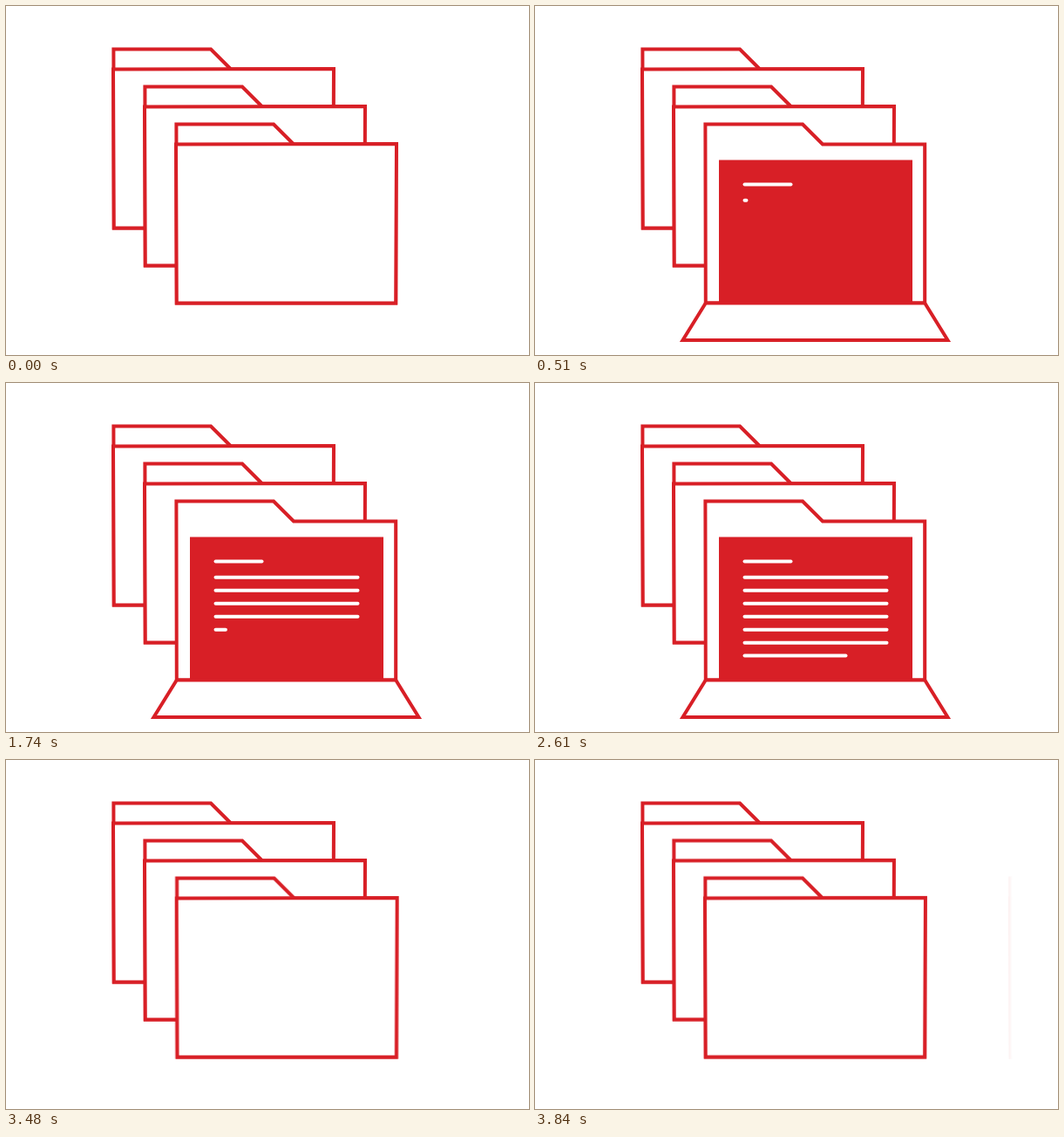
Recreate the animation shown at these times as an HTML page. Size 600 by 400 pixels, loop 4230 ms.

```html
<!DOCTYPE html>
<html lang="en">
<head>
<meta charset="utf-8">
<title>Folders</title>
<style>
  html, body { margin: 0; width: 100%; height: 100%; overflow: hidden; background: #fff; }

  svg {
    --fade: linear-gradient(90deg, transparent 33px, #000 113px, #000 478px, transparent 548px);
    display: block;
    width: 600px;
    height: 400px;
    -webkit-mask-image: var(--fade);
    mask-image: var(--fade);
  }

  .shape { fill: #fff; stroke: #d81f26; stroke-width: 4; }
  .doc { fill: #d81f26; }
  .lines { stroke: #fff; stroke-width: 4; stroke-linecap: round; stroke-dasharray: 100 200; }

  .panel, .lines path, .slide {
    animation: 4230ms cubic-bezier(.37, 0, .63, 1) infinite both;
  }

  /* Front panel folds down, then back up */
  .panel { animation-name: fold; }
  @keyframes fold {
    0%, 75.41%, 100% { d: path("M195 158.5L448 158L447.2 340.5L195.8 340.5Z"); }
    6.86%, 68.32% { d: path("M169.5 383L473.5 383L447.2 340.5L195.8 340.5Z"); }
  }

  /* Text lines are written one after another */
  .lines path:nth-child(1) { animation-name: line1; }
  .lines path:nth-child(2) { animation-name: line2; }
  .lines path:nth-child(3) { animation-name: line3; }
  .lines path:nth-child(4) { animation-name: line4; }
  .lines path:nth-child(5) { animation-name: line5; }
  .lines path:nth-child(6) { animation-name: line6; }
  .lines path:nth-child(7) { animation-name: line7; }
  .lines path:nth-child(8) { animation-name: line8; }
  @keyframes line1 { 0%, 6.83% { stroke-dashoffset: 100.1; } 11.56%, 100% { stroke-dashoffset: 0; } }
  @keyframes line2 { 0%, 11.56% { stroke-dashoffset: 100.1; } 18.65%, 100% { stroke-dashoffset: 0; } }
  @keyframes line3 { 0%, 18.65% { stroke-dashoffset: 100.1; } 25.74%, 100% { stroke-dashoffset: 0; } }
  @keyframes line4 { 0%, 25.74% { stroke-dashoffset: 100.1; } 32.84%, 100% { stroke-dashoffset: 0; } }
  @keyframes line5 { 0%, 32.84% { stroke-dashoffset: 100.1; } 39.93%, 100% { stroke-dashoffset: 0; } }
  @keyframes line6 { 0%, 39.93% { stroke-dashoffset: 100.1; } 47.02%, 100% { stroke-dashoffset: 0; } }
  @keyframes line7 { 0%, 47.02% { stroke-dashoffset: 100.1; } 54.11%, 100% { stroke-dashoffset: 0; } }
  @keyframes line8 { 0%, 54.11% { stroke-dashoffset: 100.1; } 61.21%, 100% { stroke-dashoffset: 0; } }

  /* The stack moves up by one place */
  .enter { animation-name: enter; animation-timing-function: cubic-bezier(.333, 1, .667, 1); }
  .back { animation-name: back; }
  .middle { animation-name: middle; }
  .leave { animation-name: leave; animation-timing-function: cubic-bezier(.333, 0, .667, .333); }
  @keyframes enter {
    0%, 82.74% { transform: translate(-658px, -86px); }
    91.02%, 100% { transform: translate(-72px, -86px); }
  }
  @keyframes back {
    0%, 84.87% { transform: translate(-72px, -86px); }
    91.02%, 100% { transform: translate(-36px, -43px); }
  }
  @keyframes middle {
    0%, 84.87% { transform: translate(-36px, -43px); }
    91.02%, 100% { transform: translate(0, 0); }
  }
  @keyframes leave {
    0%, 81.91% { transform: translate(0, 0); }
    90.9%, 100% { transform: translate(357.5px, 0); }
  }
</style>
</head>
<body>
<svg viewBox="0 0 600 400">
  <defs>
    <path id="cover" class="shape" d="M195.4 135.5H307L330 158.5H447.2V340.5H195.8Z"/>
    <g id="folder">
      <use href="#cover"/>
      <path class="shape" d="M195 158.5L448 158L447.2 340.5L195.8 340.5Z"/>
    </g>
  </defs>

  <g class="slide enter"><use href="#folder"/></g>
  <g class="slide back"><use href="#folder"/></g>
  <g class="slide middle"><use href="#folder"/></g>

  <g class="slide leave">
    <use href="#cover"/>
    <rect class="doc" x="211" y="176.5" width="222" height="164.5"/>
    <g class="lines">
      <path pathLength="100" d="M240.5 204.5H293.5"/>
      <path pathLength="100" d="M240.5 222.7H403.5"/>
      <path pathLength="100" d="M240.5 237.7H403.5"/>
      <path pathLength="100" d="M240.5 252.7H403.5"/>
      <path pathLength="100" d="M240.5 267.7H403.5"/>
      <path pathLength="100" d="M240.5 282.7H403.5"/>
      <path pathLength="100" d="M240.5 297.7H403.5"/>
      <path pathLength="100" d="M240.5 312.6H356.5"/>
    </g>
    <path class="shape panel" d="M195 158.5L448 158L447.2 340.5L195.8 340.5Z"/>
  </g>
</svg>
</body>
</html>
```
